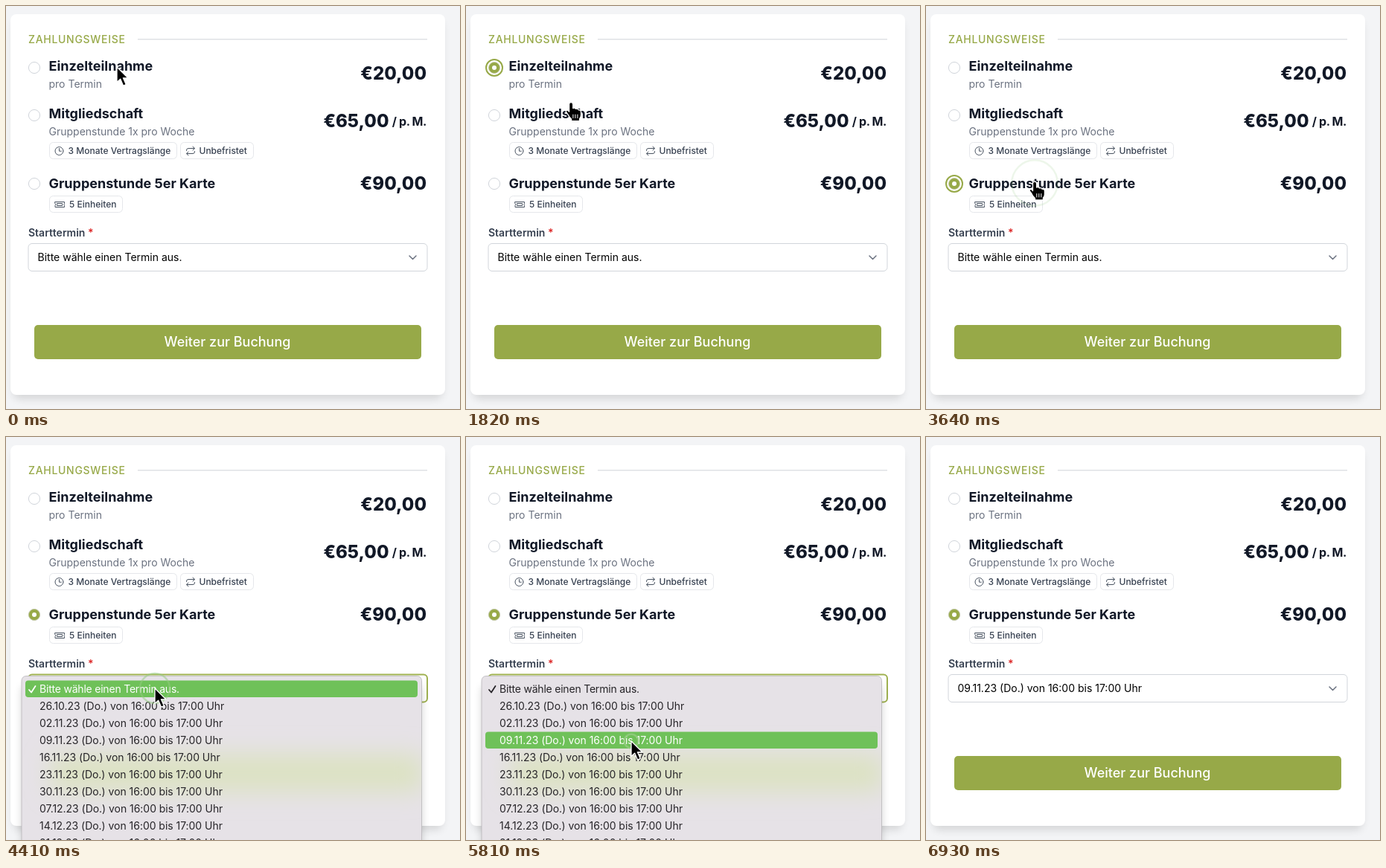
An HTML page that plays this animation: 610 px wide and 542 px high, repeating every 7 s.

```html
<!DOCTYPE html>
<html lang="de">
<head>
<meta charset="utf-8">
<title>Zahlungsweise</title>
<style>
  html, body { margin: 0; width: 100%; height: 100%; overflow: hidden; background: #f3f4f6; }
  svg { display: block; font-family: Inter, sans-serif; }
</style>
</head>
<body>
<svg id="stage" width="610" height="542" viewBox="0 0 610 542">
  <defs>
    <clipPath id="pane"><rect x="21" y="321.5" width="537.5" height="260" rx="6"/></clipPath>
    <filter id="soft" x="-10%" y="-10%" width="120%" height="120%"><feGaussianBlur stdDeviation="6"/></filter>
    <filter id="haze" x="-20%" y="-150%" width="140%" height="400%"><feGaussianBlur stdDeviation="16"/></filter>
  </defs>
</svg>
<script>
const LOOP = 7000, STEP = 70;
const GREEN = '#97a948', INK = '#111827', GREY = '#6b7280', LINE = '#e5e7eb';
const stage = document.getElementById('stage');

function el(tag, attrs, parent = stage) {
  const node = document.createElementNS('http://www.w3.org/2000/svg', tag);
  for (const key in attrs) node.setAttribute(key, attrs[key]);
  return parent.appendChild(node);
}
function box(x, y, width, height, rx, fill, more = {}, parent) {
  return el('rect', { x, y, width, height, rx, fill, ...more }, parent);
}
function text(str, x, y, size, weight, fill, more = {}, parent) {
  const node = el('text', { x, y, 'font-size': size, 'font-weight': weight, fill, ...more }, parent);
  node.textContent = str;
  return node;
}
function stroke(d, color, width, parent) {
  return el('path', { d, fill: 'none', stroke: color, 'stroke-width': width,
    'stroke-linecap': 'round', 'stroke-linejoin': 'round' }, parent);
}
const END = { 'text-anchor': 'end' };

// Card
box(10, 20, 576, 508, 8, '#000', { opacity: .13, filter: 'url(#soft)' });
box(6, 11, 584, 512, 8, '#fff');
text('ZAHLUNGSWEISE', 30, 50, 14, 500, GREEN, { 'letter-spacing': .7 });
box(177, 44, 389, 1.5, 0, '#dfe1e5');

// Payment options
function option(y, title, sub) {
  text(title, 57.5, y + (sub ? 4 : 6), 18, 700, INK);
  if (sub) text(sub, 57.5, y + 27, 14, 400, GREY);
  el('circle', { cx: 38, cy: y, r: 7.6, fill: '#fff', stroke: '#d1d5db' });
  const on = el('g', {});
  const ring = el('circle', { cx: 38, cy: y, r: 11, fill: '#fff', stroke: GREEN, 'stroke-width': 2 }, on);
  el('circle', { cx: 38, cy: y, r: 7.5, fill: GREEN, stroke: '#c3caa0', 'stroke-width': .8 }, on);
  el('circle', { cx: 38, cy: y, r: 3, fill: '#fff' }, on);
  return { on, ring };
}
function chip(x, y, width, label, labelX, icon) {
  box(x + .5, y + .5, width - 1, 22, 5, '#fff', { stroke: LINE });
  text(label, labelX, y + 16, 12, 500, '#374151');
  stroke(icon, '#4b5563', 1);
}
const options = [
  option(83, 'Einzelteilnahme', 'pro Termin'),
  option(147, 'Mitgliedschaft', 'Gruppenstunde 1x pro Woche'),
  option(239, 'Gruppenstunde 5er Karte')
];
text('€20,00', 565, 99, 24, 800, INK, END);
text('€65,00', 514.5, 163, 24, 800, INK, END);
text('/ p. M.', 565, 161, 16, 700, INK, { ...END, 'letter-spacing': -.4 });
text('€90,00', 565, 247, 24, 800, INK, END);
chip(58, 183, 172, '3 Monate Vertragslänge', 83.5,
  'M77 195a5.5 5.5 0 1 1-11 0a5.5 5.5 0 1 1 11 0M71.5 191.5v3.7h2.8');
chip(234, 183, 99, 'Unbefristet', 259.5,
  'M242.5 194.5v-.5q0-2.5 2.5-2.5h8M251 189l2.5 2.5-2.5 2.5M253.5 195.5v.5q0 2.5-2.5 2.5h-8M245 196l-2.5 2.5 2.5 2.5');
chip(58, 255, 99, '5 Einheiten', 85,
  'M66 263.5h12.5v2q-1.5 1.5 0 3v2h-12.5v-2q1.5-1.5 0-3zM69 265.5h6.5v3h-6.5z');

// Date field and button
const caption = text('Starttermin', 30, 310, 14, 600, '#374151');
el('tspan', { fill: '#dc2626' }, caption).textContent = '\u00a0*';
const field = box(30, 319.5, 536, 37, 5, '#fff');
const value = text('', 42.5, 343, 14, 400, '#000');
stroke('M542 336l4.5 4.5 4.5-4.5', GREY, 1.5);
box(38, 429, 520, 46, 5, GREEN);
text('Weiter zur Buchung', 297.5, 458, 18, 500, '#fff', { 'text-anchor': 'middle' });

// Date menu
const PLACEHOLDER = 'Bitte wähle einen Termin aus.';
const two = n => String(n).padStart(2, '0');
const rows = [PLACEHOLDER];
for (let i = 0; i < 9; i++) {
  const d = new Date(2023, 9, 26 + 7 * i);
  rows.push(`${two(d.getDate())}.${two(d.getMonth() + 1)}.23 (Do.) von 16:00 bis 17:00 Uhr`);
}
const menu = el('g', {});
box(22, 334, 536, 240, 7, '#000', { opacity: .2, filter: 'url(#soft)' }, menu);
box(21, 321.5, 537.5, 260, 6, '#e6e2e7', { stroke: '#b9b6ba', 'stroke-width': .8 }, menu);
const pane = el('g', { 'clip-path': 'url(#pane)' }, menu);
box(60, 427, 500, 50, 5, '#dce2c2', { filter: 'url(#haze)' }, pane);
const bar = box(26, 327.5, 527, 22.5, 4, '#6fc159', {}, menu);
const tick = stroke('M31 340l3 3.5 5.5-8.5', '#262428', 1.8, menu);
const labels = rows.map((row, i) =>
  text(row, 45, 344 + 23 * i, 14, 400, '#262428', { 'letter-spacing': i ? -.04 : -.21 }, menu));

// Pointer
const ripple = el('circle', { fill: 'none', stroke: '#93cb80', 'stroke-width': 2.5 });
const pointer = el('g', {});
const SHAPE = { fill: '#000', stroke: '#fff', 'stroke-width': 1.3, 'stroke-linejoin': 'round' };
const arrow = el('path', { d: 'M0 0V20.5L4.7 16.2 8.6 25.2 12.3 23.6 8.4 14.8H14.8Z', ...SHAPE }, pointer);
const hand = el('g', {}, pointer);
el('path', { d: 'M-2.5 1Q-2.5-2 0-2T2.6 1V6Q5 4.8 6.4 6.8 9 6 10 8.2 13.4 7.8 13.4 11V15Q13.4 18 11.4 20V23H.5V20.5Q-2.5 18-4 14.5L-6.6 11Q-7.4 8.6-5.4 8.4-3.8 8.4-2.5 10.6Z', ...SHAPE }, hand);
stroke('M2.8 14.5v4.5M5.8 14.5v4.5M8.8 14.5v4.5', '#fff', 1, hand);

// Timeline: [ms, x, y]
const path = [
  [0, 149, 82], [420, 150, 81], [1470, 150, 81], [2030, 137, 155], [2730, 137, 155],
  [3150, 146, 238], [3640, 146, 238], [4060, 200, 338], [4620, 200, 338],
  [5390, 222, 400], [5600, 222, 409], [6160, 222, 409], [6720, 330, 560]
];
const clicks = [770, 2100, 3290, 4200, 5740];
const OPEN = 4270, CLOSE = 5880, GONE = 6160;

function pointerAt(t) {
  let i = 0;
  while (i < path.length - 2 && t >= path[i + 1][0]) i++;
  const [t0, x0, y0] = path[i], [t1, x1, y1] = path[i + 1];
  const k = Math.min(1, (t - t0) / (t1 - t0)), e = k * k * (3 - 2 * k);
  return [x0 + (x1 - x0) * e, y0 + (y1 - y0) * e];
}
const show = (node, on) => node.setAttribute('visibility', on ? 'inherit' : 'hidden');
function set(node, attrs) {
  for (const key in attrs) node.setAttribute(key, attrs[key]);
}

function render(t) {
  const [x, y] = pointerAt(t);
  set(pointer, { transform: `translate(${x} ${y})` });
  show(pointer, t < 6720);
  const isHand = t >= 420 && t < 3780;
  show(hand, isHand);
  show(arrow, !isHand);

  const click = clicks.findLast(c => c <= t);
  const age = click === undefined ? 1 : (t - click) / 420;
  show(ripple, age < 1);
  if (age < 1) {
    const [cx, cy] = pointerAt(click);
    set(ripple, { cx, cy, r: 4 + 32 * age, opacity: 1 - age });
  }

  const chosen = t < 840 ? -1 : t < 2170 ? 0 : t < 3360 ? 1 : 2;
  options.forEach((o, i) => {
    show(o.on, i === chosen);
    show(o.ring, i === chosen && t < 4200);
  });

  const focus = t >= 4200 && t < 6440;
  set(field, { stroke: focus ? '#9fb150' : '#d1d5db', 'stroke-width': focus ? 2 : 1 });
  value.textContent = t < 6090 ? PLACEHOLDER : rows[3];

  show(menu, t >= OPEN && t < GONE);
  const fade = t < CLOSE ? 1 : Math.max(0, 1 - (t - CLOSE) / 190);
  set(menu, { opacity: fade });
  const hot = Math.max(0, Math.min(3, Math.floor((pointerAt(t - 70)[1] - 327.5) / 23)));
  set(bar, { y: 327.5 + 23 * hot });
  labels.forEach((label, i) => set(label, { fill: i === hot ? '#fff' : '#262428' }));
  set(tick, { stroke: hot ? '#262428' : '#fff' });
}

const start = performance.now();
function frame() {
  const t = (performance.now() - start) % LOOP;
  render(Math.floor(t / STEP) * STEP);
  requestAnimationFrame(frame);
}
render(0);
requestAnimationFrame(frame);
</script>
</body>
</html>
```
